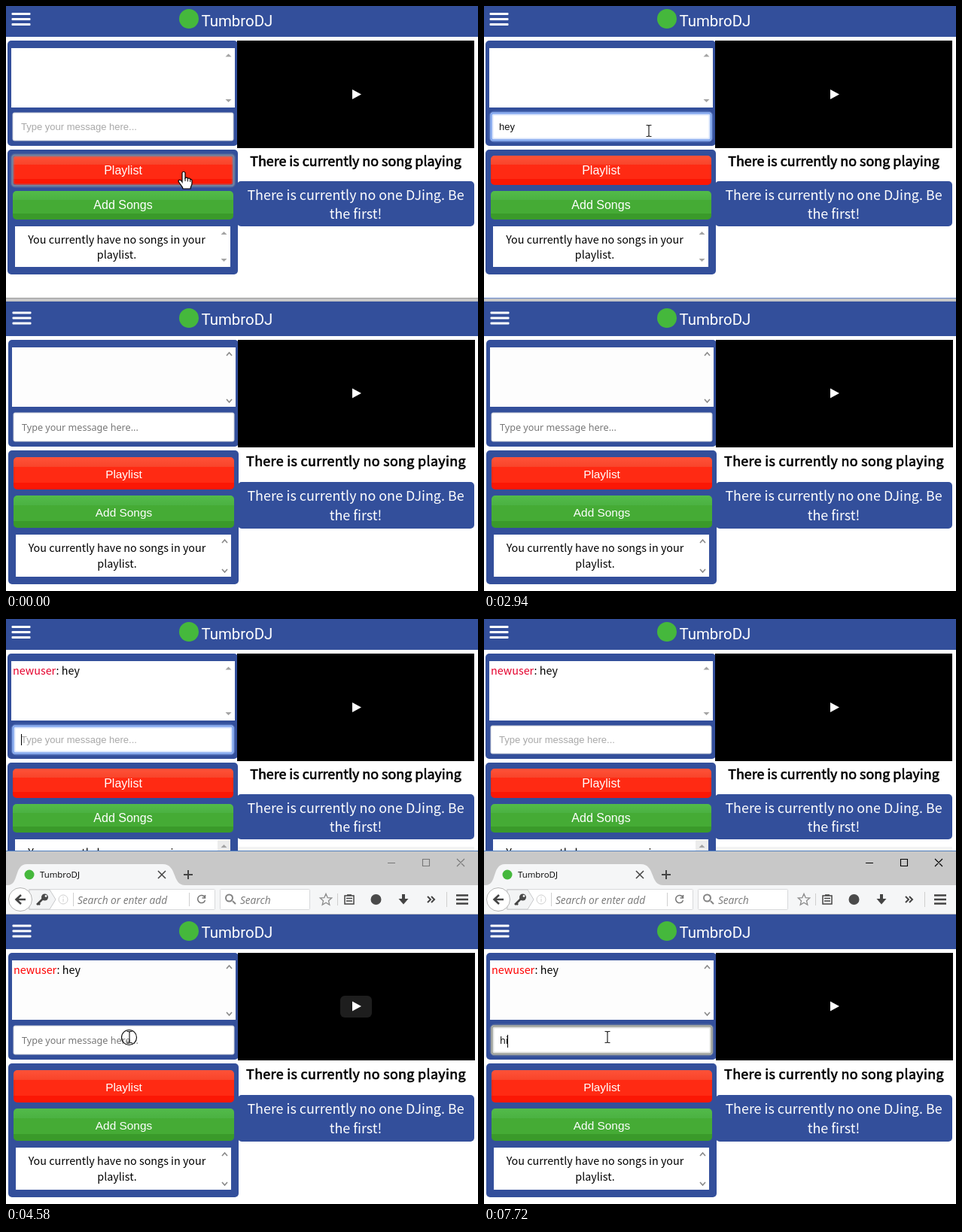
Write an HTML page that moves like this. It is 627 px wide and 778 px high and loops after 8 s.

```html
<!DOCTYPE html>
<html lang="en">
<head>
<meta charset="utf-8">
<title>TumbroDJ</title>
<style>
  html, body { margin: 0; width: 100%; height: 100%; overflow: hidden; background: #fff; }
  svg { display: block; width: 627px; height: 778px; }
  text { white-space: pre; }
  .body { font: 14.33px "Noto Sans CJK JP", "Noto Sans CJK SC", "Noto Sans CJK", sans-serif; }
  .large { font-size: 17.9px; }
  .heavy { stroke: #000; stroke-width: .65px; }
  .spaced { letter-spacing: .33px; }
  .brand { font: 20.4px Roboto, sans-serif; fill: #fff; }
  .button { font: 16px "Liberation Sans", sans-serif; fill: #fff; }
  .narrow { font-size: 15.4px; }
  .field { font: 13px "Liberation Sans", sans-serif; }
  .field2 { font: 12.6px "Noto Sans", sans-serif; }
  .tab { font: 11.4px "Open Sans", sans-serif; }
  .hint { font: italic 13.7px "Open Sans", sans-serif; fill: #777; }
  .mid { text-anchor: middle; }
  .line { fill: none; stroke: #444; stroke-width: 1.5; }
</style>
</head>
<body>
<svg id="stage" viewBox="0 0 627 778" xmlns="http://www.w3.org/2000/svg"></svg>
<script>
const BLUE = '#334f9b', GREEN = '#45b83c';
const $ = id => document.getElementById(id);

const rect = (x, y, right, bottom, fill, r = 0, extra = '') =>
  `<rect x="${x}" y="${y}" width="${right - x}" height="${bottom - y}" fill="${fill}" rx="${r}" ${extra}/>`;
const text = (x, y, cls, content, extra = '') =>
  `<text x="${x}" y="${y}" class="${cls}" ${extra}>${content}</text>`;
const path = (d, extra = 'class="line"') => `<path d="${d}" ${extra}/>`;
const dot = (x, y, r, fill) => `<circle cx="${x}" cy="${y}" r="${r}" fill="${fill}"/>`;
const group = (id, content) => `<g id="${id}">${content}</g>`;

const bands = (id, ...colors) => {
  const [hi, top, mid, low] = colors;
  return `<linearGradient id="${id}" x2="0" y2="1">
    <stop stop-color="${hi}"/><stop offset=".31" stop-color="${top}"/>
    <stop offset=".31" stop-color="${mid}"/><stop offset=".8" stop-color="${mid}"/>
    <stop offset=".8" stop-color="${low}"/><stop offset="1" stop-color="${low}"/></linearGradient>`;
};

const glow = (id, x, y, right, bottom, color) => group(id,
  rect(x, y, right, bottom, 'none', 4, `stroke="${color}" stroke-width="6" opacity=".3"`) +
  rect(x, y, right, bottom, 'none', 3, `stroke="${color}" stroke-width="2.5"`));

const triangle = (x, y, dir) =>
  path(`M${x - 4} ${y + 2 * dir}h8l-4 ${-4 * dir}z`, 'fill="#a3a3a3"');
const chevron = (x, y, dir) =>
  path(`M${x - 3.5} ${y + 2 * dir}l3.5 ${-4 * dir}l3.5 ${4 * dir}`, 'fill="none" stroke="#8a8a8a" stroke-width="1.6"');

const header = (y, bottom, x, barY, logoY, baseline) =>
  rect(0, y, 627, bottom, BLUE) +
  [0, 7, 14].map(d => rect(x, barY + d, x + 25, barY + d + 3, '#fff', 1)).join('') +
  dot(243, logoY, 13, GREEN) +
  text(259.5, baseline, 'brand', 'TumbroDJ');

const video = (x, y, cy, id) =>
  rect(x, y, x + 315, y + 143, '#000') +
  group(id, rect(444, cy - 14, 486, cy + 15, '#1e1e1e', 6)) +
  path(`M460 ${cy - 6.5}l12 6.5l-12 6.5z`, 'fill="#fff"');

const notice = (x, y, bottom, first, second) =>
  rect(x, y, 622, bottom, BLUE, 5) +
  text(464.5, first, 'body large mid', 'There is currently no one DJing. Be', 'fill="#fff"') +
  text(464.5, second, 'body large mid', 'the first!', 'fill="#fff"');

const emptyList = (x, first, second) =>
  text(x, first, 'body mid', 'You currently have no songs in your') +
  text(x, second, 'body mid', 'playlist.');

const chatLine = (id, x, y, color) => group(id,
  text(x, y, 'body', `<tspan fill="${color}">newuser</tspan>: hey`));

const field = (n, x, y, bottom, cls, baseline, gray, ring) =>
  rect(x, y, x + 293, bottom, '#fff', 2, 'stroke="#c9cdd6"') +
  glow('focus' + n, x + .5, y + .5, x + 292.5, bottom - .5, ring) +
  text(x + 11, baseline, cls, 'Type your message here...', `id="hint${n}" fill="${gray}"`) +
  text(x + 11, baseline, cls, '', `id="typed${n}" fill="#111"`) +
  `<rect id="caret${n}" y="${baseline - 12}" width="1" height="${n === 1 ? 15 : 17}" fill="#000"/>`;

const topPage =
  header(0, 41, 7.5, 9, 17, 27) +
  rect(2, 46, 308, 186, BLUE, 5) + rect(7, 56, 304, 135, '#fff') +
  triangle(295.5, 65.5, 1) + triangle(295.5, 126, -1) +
  chatLine('chat1', 9, 74, '#e5002d') +
  field(1, 9, 142, 179, 'field', 165, '#a9a9a9', '#86aaf0') +
  rect(2, 191, 308, 357, BLUE, 5) +
  rect(9, 199, 302, 238, 'url(#red)', 5) +
  glow('ring', 8.5, 198.5, 302.5, 239, '#71819f') +
  text(155.5, 224, 'button mid', 'Playlist') +
  rect(9, 246, 302, 284, 'url(#green)', 5) +
  text(155.5, 270, 'button mid', 'Add Songs') +
  rect(12, 293, 298, 347, '#fff') +
  triangle(289.5, 302, 1) + triangle(289.5, 338, -1) +
  emptyList(147, 316, 336) +
  video(307, 46, 117.5, 'plate1') +
  text(464.5, 213, 'body large mid heavy', 'There is currently no song playing') +
  notice(307, 233, 293, 258, 283);

const bottomPage =
  rect(0, 389, 627, 393, '#c6c6c6') +
  '<rect id="edge" y="388" width="627" height="1"/>' +
  header(393, 439, 8.5, 406.5, 415, 424) +
  rect(3, 444, 309, 586, BLUE, 5) + rect(8, 454, 305, 533, '#fdfdfd') +
  chevron(296.5, 463, 1) + chevron(296.5, 525, -1) +
  chatLine('chat2', 10, 472, '#f00') +
  field(2, 10, 541, 579, 'field2', 565, '#777', '#a3a69f') +
  rect(3, 591, 309, 769, BLUE, 5) +
  rect(10, 600, 303, 643, 'url(#red)', 5) +
  text(156.5, 628, 'button narrow mid', 'Playlist') +
  rect(10, 651, 303, 694, 'url(#green)', 5) +
  text(156.5, 679, 'button narrow mid', 'Add Songs') +
  rect(13, 703, 299, 759, '#fff') +
  chevron(290.5, 712, 1) + chevron(290.5, 751, -1) +
  emptyList(147.5, 726, 747) +
  video(308, 444, 515, 'plate2') +
  text(465, 612, 'body large mid heavy spaced', 'There is currently no song playing') +
  notice(308, 633, 695, 658, 684);

const browser = group('browser',
  rect(281, 294, 298, 308, '#ececec') + triangle(289.5, 302, 1) +
  rect(308, 303, 622, 308, '#f3f3f3') +
  rect(0, 308, 627, 309, '#4f7fc0') + rect(0, 309, 627, 354, '#c8c8c8') +
  rect(0, 354, 627, 392, '#f5f6f7') + rect(0, 392, 627, 393, '#b9bcc4') +
  path('M2 354C18 354 10 326 28 326H208C228 326 220 354 238 354z', 'fill="#f5f6f7"') +
  dot(31, 340, 6.5, GREEN) +
  text(45, 344, 'tab', 'TumbroDJ') +
  path('M202 335l10 10m0-10l-10 10') +
  path('M236 340h12m-6-6v12', 'class="line" style="stroke-width:2"') +
  path('M507 324.5h10M553.5 319.5h9v9h-9zM599 319l10 10m0-10l-10 10',
    'id="winButtons" fill="none" stroke-width="1.1"') +
  // address bar
  rect(30, 359.5, 277.5, 386.5, '#fff', 1, 'stroke="#d8d9db"') +
  path('M31 360h27l8 13l-8 13h-27z', 'fill="#f3f4f5" stroke="#c7c8ca"') +
  '<circle cx="19" cy="373" r="15.5" fill="#fff" stroke="#b5b5b5"/>' +
  path('M26 373H14m6-6l-6.5 6l6.5 6', 'class="line" style="stroke-width:2.6"') +
  dot(51.5, 370, 4.5, '#4a4a4a') + dot(53, 368.5, 1.4, '#f3f4f5') +
  path('M49 372l-8 8m2-2l2 2', 'class="line" style="stroke-width:2.6"') +
  '<circle cx="76" cy="373" r="6" fill="none" stroke="#cfcfcf"/>' +
  path('M76 372v4m0-7v1.5M89.5 364v18M243.5 364v18', 'stroke="#cfcfcf"') +
  text(95, 379, 'hint', 'Search or enter add') +
  path('M264 370a5 5 0 1 0 .5 4M264.5 367v4h-4', 'class="line" style="stroke:#777"') +
  rect(284.5, 359.5, 403.5, 386.5, '#fff', 1, 'stroke="#d8d9db"') +
  path('M301 375l4 4M292 371a4.5 4.5 0 1 0 9 0a4.5 4.5 0 1 0-9 0', 'class="line" style="stroke:#858585;stroke-width:2"') +
  text(311, 379, 'hint', 'Search') +
  // toolbar icons
  path('M425 365.5l2.2 5.1l5.5.5l-4.2 3.6l1.3 5.4l-4.8-2.9l-4.8 2.9l1.3-5.4l-4.2-3.6l5.5-.5z',
    'fill="none" stroke="#8c8c8c" stroke-width="1.3"') +
  path('M440.5 365v16M585.5 363v20', 'stroke="#cfcfcf"') +
  path('M450 368h12v11h-12zM453 367h6M452 371.5h8m-8 3.5h8') +
  dot(491.5, 373, 7, '#4a4a4a') +
  path('M526 366h4v6h4.5l-6.5 7.5l-6.500-7.500h4.500z', 'fill="#444"') +
  path('M560 369l4 4l-4 4m5-8l4 4l-4 4', 'class="line" style="stroke-width:2"') +
  path('M598 367.500h16m-16 5.500h16m-16 5.500h16', 'class="line" style="stroke-width:2.400"'));

const cursors =
  group('hand', path('M-2 1C-2-1 2-1 2 1V8C3 6.500 5 7 5.500 8.500C7 7.500 8.500 8 8.700 9.700C10 9 11 10 11 11.500V15C11 18 9 19 9 22H-1C-1 19-6 15-7 12C-7 10-4 9.500-2 13z',
    'fill="#fff" stroke="#000" stroke-width="1.200"') + path('M2 8v4M5.500 9v3.500M8.700 10v3', 'stroke="#000"')) +
  group('arrow', path('M0 0v16l4-3.500l2.500 5.500l2.500-1l-2.500-5.500h5z', 'fill="#fff" stroke="#000"')) +
  group('beam', path('M-3.500-7.500h2.500l1 1l1-1h2.500M0-6.500v13M-3.500 7.500h2.500l1-1l1 1h2.500',
    'fill="none" stroke="#222" stroke-width="1.200"')) +
  '<circle id="click" cx="163.500" cy="556.500" r="10" fill="none" stroke="#111" stroke-width="1.200"/>';

$('stage').innerHTML =
  '<defs>' + bands('red', '#ff5238', '#f8442a', '#ff2a13', '#fb1705') +
  bands('green', '#52bb49', '#4bb142', '#45ab35', '#3a9a2a') + '</defs>' +
  topPage + bottomPage + browser + cursors;

// Each track is a list of [start ms, value]; values hold until the next start.
const tracks = {
  pointer: [[0, ['hand', 236, 221]], [160, ['hand', 236, 199]], [300, ['hand', 228, 186]],
    [425, ['beam', 219, 168]], [550, ['beam', 219, 166]], [3890, ['hand', 206, 215]],
    [4020, ['arrow', 187, 400]], [4160, ['arrow', 174, 446]], [4280, ['beam', 168, 530]],
    [4440, ['beam', 164, 551]], [4580, ['beam', 164, 556]]],
  ring: [[0, 1], [300, .6], [425, .3], [550, 0]],
  focus1: [[0, 0], [1130, .4], [1250, .8], [1370, 1], [4700, .4], [4860, 0]],
  focus2: [[0, 0], [4700, .5], [4860, .9], [4980, 1]],
  typed1: [[0, ''], [2200, 'h'], [2350, 'he'], [2520, 'hey'], [3370, '']],
  typed2: [[0, ''], [6490, 'h'], [6760, 'hi']],
  caret1: [[0, 0], [1130, 20], [1930, 0], [2200, 27], [2350, 34], [2520, 41], [2940, 0],
    [3890, 20], [4700, 0]],
  caret2: [[0, 0], [4860, 21], [5280, 0], [5680, 21], [6210, 0], [6490, 28], [6760, 31],
    [7190, 0], [7720, 31]],
  chat1: [[0, 0], [3370, 1]],
  chat2: [[0, 0], [3500, 1]],
  plate1: [[0, 0]],
  plate2: [[0, 0], [4580, 1], [4700, 0]],
  browser: [[0, 0], [4580, 1]],
  click: [[0, 0], [4580, 1], [4700, 0]],
  edge: [[0, '#9a9a9a'], [1130, '#6586cc']],
  winButtons: [[0, '#777'], [4700, '#000']]
};
const valueAt = (name, t) => tracks[name].findLast(([start]) => start <= t)[1];

function draw(t) {
  for (const id of ['ring', 'focus1', 'focus2', 'chat1', 'chat2', 'plate1', 'plate2', 'browser', 'click'])
    $(id).style.opacity = valueAt(id, t);
  for (const n of [1, 2]) {
    const typed = valueAt('typed' + n, t), x = valueAt('caret' + n, t);
    $('typed' + n).textContent = typed;
    $('hint' + n).style.opacity = typed ? 0 : 1;
    $('caret' + n).style.opacity = x ? 1 : 0;
    $('caret' + n).setAttribute('x', x);
  }
  $('edge').style.fill = valueAt('edge', t);
  $('winButtons').style.stroke = valueAt('winButtons', t);
  const [shape, x, y] = valueAt('pointer', t);
  for (const id of ['hand', 'arrow', 'beam']) $(id).style.opacity = id === shape ? 1 : 0;
  $(shape).setAttribute('transform', `translate(${x} ${y})`);
}

const begin = performance.now();
function tick() {
  draw((performance.now() - begin) % 8000);
  requestAnimationFrame(tick);
}
tick();
</script>
</body>
</html>
```
